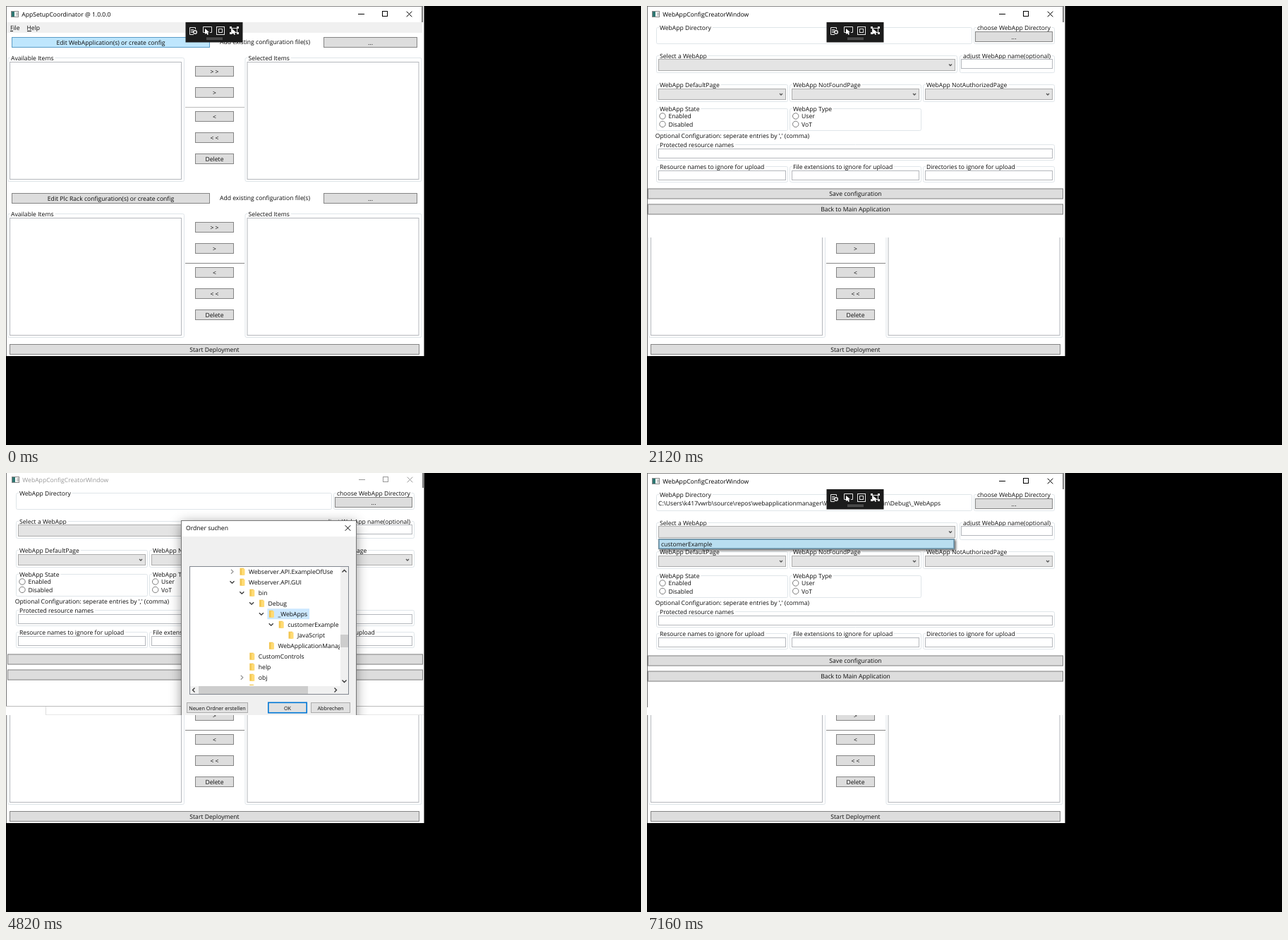
An HTML page with a canvas for the animation above (8 s loop, 900 by 622 pixels).

```html
<!DOCTYPE html>
<html lang="en">
<head>
<meta charset="utf-8">
<title>Configuration walkthrough</title>
<style>
  html, body { margin: 0; width: 100%; height: 100%; overflow: hidden; background: #000; }
  canvas { display: block; }
</style>
</head>
<body>
<canvas id="stage" width="900" height="622"></canvas>
<script>
const ctx = document.getElementById('stage').getContext('2d');
const LOOP = 8000;
const FACE = '#ddd', EDGE = '#858585', FIELD = '#b4b7bc', GROUP = '#dfe5e9', INK = '#0c0c0c';

// Rectangles take left, top, right, bottom edges.
function fill(l, t, r, b, color) {
  ctx.fillStyle = color;
  ctx.fillRect(l, t, r - l, b - t);
}

function box(l, t, r, b, face, edge, width = 1) {
  fill(l, t, r, b, face);
  ctx.strokeStyle = edge;
  ctx.lineWidth = width;
  ctx.strokeRect(l + width / 2, t + width / 2, r - l - width, b - t - width);
}

function line(points, color, width = 1) {
  ctx.beginPath();
  for (let i = 0; i < points.length; i += 2) ctx.lineTo(points[i], points[i + 1]);
  ctx.strokeStyle = color;
  ctx.lineWidth = width;
  ctx.stroke();
}

function text(string, x, y, { color = INK, align = 'left', size = 8.6 } = {}) {
  ctx.font = `${size}px "Open Sans", "Noto Sans", sans-serif`;
  ctx.textAlign = align;
  ctx.fillStyle = color;
  ctx.fillText(string, x, y + 3);
}

function button(l, t, r, b, label, face = FACE, edge = EDGE) {
  box(l, t, r, b, face, edge);
  text(label, (l + r) / 2, (t + b) / 2 + 0.4, { align: 'center' });
}

function chevron(x, y, dir, color = '#333', s = 3) {
  const dx = { right: 1, left: -1 }[dir] || 0;
  const dy = { down: 1, up: -1 }[dir] || 0;
  const h = s / 2;
  line([x - dx * h - dy * s, y - dy * h - dx * s, x + dx * h, y + dy * h,
        x - dx * h + dy * s, y - dy * h + dx * s], color, 1.3);
}

function group(l, t, r, b, label) {
  ctx.beginPath();
  ctx.roundRect(l + 0.5, t + 0.5, r - l - 1, b - t - 1, 2);
  ctx.strokeStyle = GROUP;
  ctx.lineWidth = 1;
  ctx.stroke();
  ctx.font = '8.6px "Open Sans", "Noto Sans", sans-serif';
  fill(l + 4, t - 1, l + 7 + ctx.measureText(label).width, t + 2, '#fff');
  text(label, l + 5, t + 0.5);
}

function field(l, t, r, b) {
  box(l, t, r, b, '#fff', FIELD);
}

function combo(l, t, r, b) {
  box(l, t, r, b, '#e4e4e4', '#acacac');
  chevron(r - 7, (t + b) / 2, 'down', '#555', 2);
}

function radio(x, y, label) {
  ctx.beginPath();
  ctx.arc(x, y, 4.2, 0, 7);
  ctx.strokeStyle = '#707070';
  ctx.lineWidth = 0.9;
  ctx.stroke();
  text(label, x + 8.4, y + 0.4);
}

function cross(x, y, s, color) {
  line([x - s, y - s, x + s, y + s], color);
  line([x - s, y + s, x + s, y - s], color);
}

function titleBar(title, color) {
  box(7, 7, 18, 16, '#fff', '#888');
  fill(8, 8, 12, 15, '#2f7772');
  fill(14, 9, 17, 14, '#ccc');
  text(title, 22.3, 12, { color });
  line([499, 11.5, 508, 11.5], color);
  ctx.strokeRect(533.5, 7.5, 7, 7);
  cross(571.5, 11.5, 3.8, color);
  line([590, 0, 590, 23], '#000');
  line([0, 0.5, 590, 0.5], '#888');
}

function pointer(x, y) {
  ctx.beginPath();
  [[0, 0], [0, 8], [2, 6.4], [3.5, 9], [5, 8], [3.7, 5.5], [6, 5.2]]
    .forEach(([dx, dy]) => ctx.lineTo(x + dx, y + dy));
  ctx.fillStyle = '#fff';
  ctx.fill();
}

function debugBar() {
  const pale = '#e4e4e4';
  fill(254.5, 23, 335.5, 51.5, '#1c1c1c');
  line([266, 40.5, 260.5, 40.5, 260.5, 30.5, 268.5, 30.5, 268.5, 33], pale);
  for (const y of [33.5, 35.5, 37.5]) line([262, y, 266, y], pale);
  ctx.beginPath();
  ctx.arc(268, 37, 2.3, 0, 7);
  ctx.lineWidth = 1.5;
  ctx.stroke();
  line([283, 37.5, 279.5, 37.5, 279.5, 29.5, 291.5, 29.5, 291.5, 37.5, 289, 37.5], pale);
  pointer(282, 32);
  ctx.strokeRect(298.5, 29.5, 11, 11);
  ctx.strokeRect(301.5, 32.5, 5, 5);
  ctx.strokeRect(319.5, 31.5, 8, 6);
  for (const x of [317, 327]) for (const y of [29, 37]) fill(x, y, x + 3, y + 3, pale);
  pointer(320, 32);
  fill(284, 45, 307, 46, '#777');
  fill(284, 47, 307, 48, '#666');
}

function transferPanel(top, editLabel, active) {
  ctx.save();
  ctx.translate(0, top);
  button(8, 44, 289, 59, editLabel, active ? '#bee6fd' : FACE, active ? '#5a9cc7' : EDGE);
  text('Add existing configuration file(s)', 303, 51);
  button(450, 44, 583, 59, '...');
  for (const [x, label] of [[2, 'Available Items'], [338.5, 'Selected Items']]) {
    group(x, 73, x + 251, 249, label);
    field(x + 3, 79, x + 247, 246);
  }
  ['>>', '>', '<', '<<', 'Delete'].forEach((label, i) => {
    const y = 85 + i * 30 + (i > 1 ? 4 : 0);
    button(268, y, 323, y + 15, label.length === 2 ? label.split('').join(' ') : label);
  });
  fill(254, 143, 338, 144, top ? '#888' : '#bbb');
  ctx.restore();
}

function mainWindow() {
  fill(0, 0, 592.5, 496, '#fff');
  fill(1, 23, 590, 38, '#f0f0f0');
  titleBar('AppSetupCoordinator @ 1.0.0.0', '#000');
  text('File', 6, 30.5);
  text('Help', 29.5, 30.5);
  fill(6, 35, 10, 36, INK);
  fill(30, 35, 36, 36, INK);
  transferPanel(0, 'Edit WebApplication(s) or create config', true);
  transferPanel(221, 'Edit Plc Rack configuration(s) or create config', false);
  button(5, 479, 586, 494, 'Start Deployment');
  fill(0, 0, 1, 496, '#777');
}

function creatorWindow(titleColor = '#000', path = '') {
  titleBar('WebAppConfigCreatorWindow', titleColor);
  const columns = [13, 202, 391];

  group(13, 30, 461, 54, 'WebApp Directory');
  text(path, 16, 42.5);
  group(463, 30, 578, 54, 'choose WebApp Directory');
  button(465, 36, 575, 51, '...');

  group(13, 70, 440, 95, 'Select a WebApp');
  combo(16, 75, 437, 92);
  group(443, 70, 578, 95, 'adjust WebApp name(optional)');
  field(445, 75, 575, 89);

  ['DefaultPage', 'NotFoundPage', 'NotAuthorizedPage'].forEach((page, i) => {
    const x = columns[i];
    group(x, 111, x + 187, 136, 'WebApp ' + page);
    combo(x + 3, 117, x + 184, 133);
  });

  group(13, 145, 200, 177, 'WebApp State');
  radio(22, 156, 'Enabled');
  radio(22, 167.4, 'Disabled');
  group(202, 145, 389, 177, 'WebApp Type');
  radio(210.7, 156, 'User');
  radio(210.7, 167.4, 'VoT');

  text("Optional Configuration: seperate entries by ',' (comma)", 11.8, 184);
  group(13, 196, 578, 219, 'Protected resource names');
  field(16, 202, 575, 216);
  ['Resource names', 'File extensions', 'Directories'].forEach((kind, i) => {
    const x = columns[i];
    group(x, 227, x + 187, 250, kind + ' to ignore for upload');
    field(x + 3, 233, x + 184, 247);
  });
  button(1, 258.5, 590, 273.5, 'Save configuration');
  button(1, 280.5, 590, 295.5, 'Back to Main Application');
}

function folder(x, y) {
  fill(x - 3.5, y - 5, x + 2, y + 5, '#f3c64f');
  fill(x - 1, y - 4, x + 3.5, y + 5, '#ffdb74');
}

// Each row: nesting level, folder name, arrow direction.
const TREE = [
  [0, 'Webserver.API.ExampleOfUse', 'right'], [0, 'Webserver.API.GUI', 'down'],
  [1, 'bin', 'down'], [2, 'Debug', 'down'], [3, '_WebApps', 'down'],
  [4, 'customerExample', 'down'], [5, 'JavaScript'], [3, 'WebApplicationManager'],
  [1, 'CustomControls'], [1, 'help'], [1, 'obj', 'right'], [1, '']
];

function folderDialog() {
  ctx.save();
  ctx.shadowColor = 'rgba(0,0,0,.45)';
  ctx.shadowBlur = 16;
  ctx.shadowOffsetY = 4;
  fill(249, 67, 496, 500, '#f0f0f0');
  ctx.restore();
  box(248, 67, 497, 500, '#f0f0f0', '#777');
  fill(249, 68, 496, 90, '#fff');
  text('Ordner suchen', 255, 78.3, { color: '#000' });
  cross(484.5, 78, 3.8, '#000');

  box(260, 132, 486, 314, '#fff', '#828790');
  ctx.save();
  ctx.beginPath();
  ctx.rect(261, 133, 212, 168);
  ctx.clip();
  TREE.forEach(([level, name, arrow], i) => {
    const x = 335 + level * 13.8, y = 139.7 + i * 15;
    if (name === '_WebApps') fill(x - 6, y - 7.5, 430, y + 7.5, '#cce8ff');
    folder(x, y);
    if (arrow) chevron(x - 14.5, y, arrow, arrow === 'down' ? '#333' : '#999');
    text(name, x + 9, y + 0.2);
  });
  ctx.restore();

  fill(474, 133, 485, 302, '#f0f0f0');
  fill(474, 229, 485, 247, '#cdcdcd');
  chevron(479.5, 139, 'up');
  chevron(479.5, 295, 'down');
  fill(261, 302, 485, 313, '#f0f0f0');
  fill(273, 302, 428, 313, '#cdcdcd');
  chevron(266, 307.5, 'left');
  chevron(467, 307.5, 'right');

  const small = { align: 'center', size: 7.3 };
  box(256, 325, 343, 340, '#e1e1e1', '#adadad');
  text('Neuen Ordner erstellen', 299.5, 332.7, small);
  box(371, 324.5, 427, 340.5, '#e1e1e1', '#0078d7', 1.6);
  text('OK', 399, 332.7, small);
  box(432, 325, 488, 340, '#e1e1e1', '#adadad');
  text('Abbrechen', 460, 332.7, small);
}

function dropDown() {
  ctx.save();
  ctx.shadowColor = 'rgba(0,0,0,.55)';
  ctx.shadowBlur = 3;
  ctx.shadowOffsetX = ctx.shadowOffsetY = 2;
  fill(16, 93, 436, 108, '#8fa5b0');
  ctx.restore();
  box(16, 93, 436, 108, '#b9def0', '#6d8b9b');
  ctx.setLineDash([1, 1]);
  ctx.strokeStyle = '#3d6f8c';
  ctx.strokeRect(17.5, 94.5, 417, 12);
  ctx.setLineDash([]);
  text('customerExample', 20, 100.8);
}

function overlay(l, t, r, b, draw) {
  ctx.save();
  ctx.beginPath();
  ctx.rect(l, t, r - l, b - t);
  ctx.clip();
  fill(l, t, r, b, '#fff');
  draw();
  ctx.restore();
}

function showCreator() {
  overlay(1, 0, 591, 328, () => {
    creatorWindow();
    debugBar();
  });
}

function showFolderDialog() {
  overlay(0, 0, 592, 343, () => {
    ctx.save();
    ctx.translate(1, -2);
    creatorWindow('#999');
    ctx.restore();
    fill(0, 0, 1, 331, '#777');
    fill(0, 330, 592, 331, '#bbb');
    fill(56, 331, 57, 343, '#ddd');
    fill(57, 342, 592, 343, '#e8e8e8');
    folderDialog();
  });
}

function showDropDown() {
  overlay(0, 0, 592, 343, () => {
    creatorWindow('#000', 'C:\\Users\\k417vwrb\\source\\repos\\webapplicationmanager\\Webserver.API.GUI\\bin\\Debug\\_WebApps');
    dropDown();
    debugBar();
    fill(0, 0, 1, 332, '#777');
  });
}

function render(time) {
  ctx.textRendering = 'geometricPrecision';
  fill(0, 0, 900, 622, '#000');
  mainWindow();
  if (time < 500) debugBar();
  else if (time < 3200) showCreator();
  else if (time < 5900) showFolderDialog();
  else showDropDown();
}

const start = performance.now();
function tick() {
  render((performance.now() - start) % LOOP);
  requestAnimationFrame(tick);
}
tick();
</script>
</body>
</html>
```
